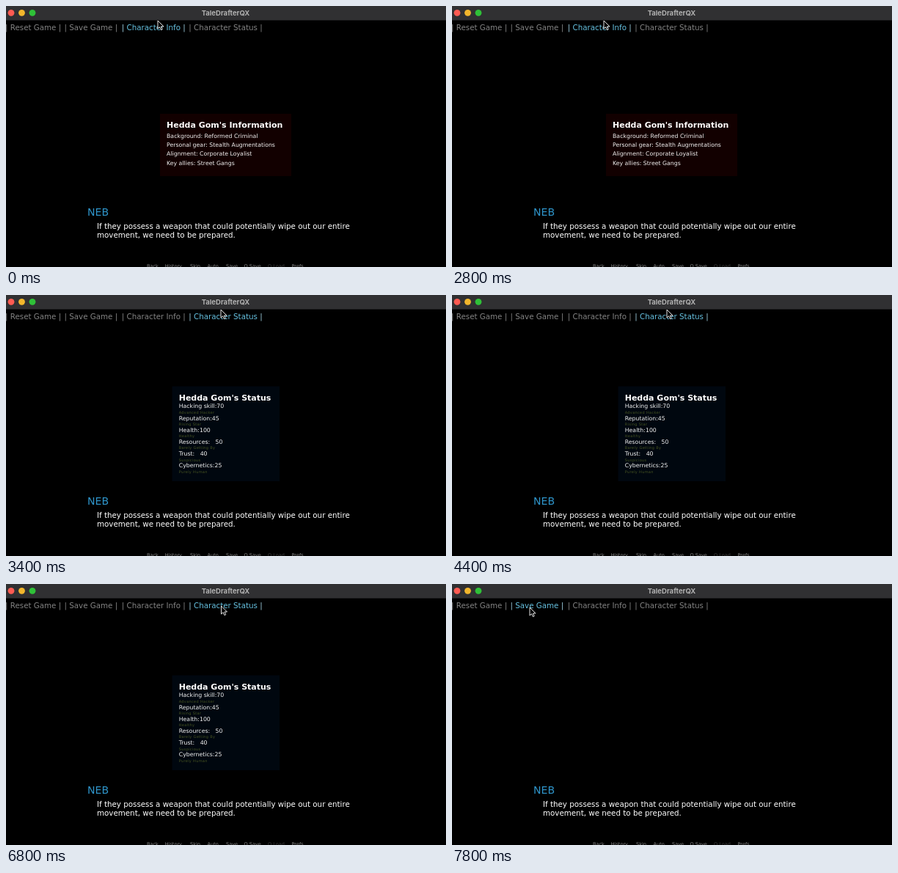
Write an HTML page that moves like this. It is 600 px wide and 356 px high and loops after 8000 ms.

```html
<!DOCTYPE html>
<html lang="en">
<head>
<meta charset="utf-8">
<title>Visual novel menu</title>
<style>
  html, body { margin: 0; width: 100%; height: 100%; overflow: hidden; background: #000; }
  svg { display: block; width: 100%; height: 100%; }
  text { font-family: "DejaVu Sans", sans-serif; white-space: pre; }
  .window-title { font: bold 9.5px Inter, sans-serif; fill: #b1b1b1; text-anchor: middle; }
  .menu { font-size: 10.31px; fill: #838383; }
  .menu.hover { fill: #66c1e0; }
  .menu.hover .bar { fill: #9fd0e2; }
  .speaker { font-size: 14.06px; fill: #2f96cc; }
  .speech { font-size: 10.31px; fill: #fff; }
  .quick { font-size: 6.56px; fill: #858585; }
  .quick.off { fill: #3c3c3c; }
  .heading { font-size: 11px; font-weight: bold; fill: #fff; }
  .detail { font-size: 7.8px; fill: #f4f4f4; }
  .note { font-size: 5px; letter-spacing: .33px; fill: #465422; }
</style>
</head>
<body>
<svg viewBox="0 0 600 356">
  <rect width="600" height="356"/>
  <rect width="600" height="19.5" fill="#303032"/>
  <circle cx="7" cy="9.3" r="4.4" fill="#ff5b52"/>
  <circle cx="21.5" cy="9.3" r="4.4" fill="#f2b62c"/>
  <circle cx="36" cy="9.3" r="4.4" fill="#2fc138"/>
  <text class="window-title" x="299.5" y="12.6">TaleDrafterQX</text>
  <g id="menu"></g>
  <g id="info"><rect x="210" y="147" width="179" height="85" fill="#120000"/></g>
  <g id="status"><rect x="226.5" y="124.5" width="146.5" height="129.5" fill="#00070f"/></g>
  <text class="speaker" x="111" y="286">NEB</text>
  <text class="speech" x="124" y="304">If they possess a weapon that could potentially wipe out our entire</text>
  <text class="speech" x="124" y="316.3">movement, we need to be prepared.</text>
  <g id="quick"></g>
  <path id="cursor" d="M0 0V11L2.6 8.7 4.4 12.6 6.2 11.8 4.5 8H8Z" stroke="#fff" stroke-width=".9"/>
</svg>
<script>
const $ = id => document.getElementById(id);

function addText(parent, className, x, y, content) {
  const node = document.createElementNS("http://www.w3.org/2000/svg", "text");
  node.setAttribute("class", className);
  node.setAttribute("x", x);
  node.setAttribute("y", y);
  node.innerHTML = content;
  parent.append(node);
  return node;
}

const bar = '<tspan class="bar">|</tspan>';
const buttons = [[-1, "Reset Game"], [79.5, "Save Game"], [157.7, "Character Info"], [249.2, "Character Status"]]
  .map(([x, label]) => addText($("menu"), "menu", x, 32.5, `${bar} ${label} ${bar}`));
const [, SAVE, INFO, STATUS] = buttons.keys();

[[192, "Back"], [216.7, "History"], [251, "Skip"], [274.5, "Auto"], [300, "Save"],
 [324.5, "Q.Save"], [357, "Q.Load"], [389.5, "Prefs"]].forEach(([x, label]) =>
  addText($("quick"), label === "Q.Load" ? "quick off" : "quick", x, 356.7, label));

const person = "Hedda Gom";
addText($("info"), "heading", 219, 166, `${person}'s Information`);
["Background: Reformed Criminal", "Personal gear: Stealth Augmentations",
 "Alignment: Corporate Loyalist", "Key allies: Street Gangs"].forEach((line, i) =>
  addText($("info"), "detail", 219, 179.5 + i * 12.45, line));

addText($("status"), "heading", 235.7, 143.7, `${person}'s Status`);
[["Hacking skill:70", "Advanced Hacker"], ["Reputation:45", "Rising Star"], ["Health:100", "Healthy"],
 ["Resources:   50", "Barely Getting By"], ["Trust:   40", "Suspicious"], ["Cybernetics:25", "Purely Human"]]
  .forEach(([line, note], i) => {
    const y = 154.4 + i * 16.2;
    addText($("status"), "detail", 235.7, y, line);
    addText($("status"), "note", 235.7, y + 7.3, note);
  });

// start time, cursor x, cursor y, hovered button
const steps = [
  [0, 207, 20, INFO],
  [3000, 228, 20, INFO],
  [3200, 283, 20, STATUS],
  [3400, 293, 20, STATUS],
  [6600, 293, 25, STATUS],
  [6800, 293.5, 30, STATUS],
  [7000, 291, 35, STATUS],
  [7200, 265, 44, -1],
  [7400, 194, 46, -1],
  [7600, 128, 40, -1],
  [7800, 106, 32, SAVE],
];
const LOOP = 8000;
const start = performance.now();

function draw(now) {
  const time = Math.max(0, now - start) % LOOP;
  const [, x, y, hovered] = steps.findLast(step => step[0] <= time);
  $("cursor").setAttribute("transform", `translate(${x} ${y})`);
  buttons.forEach((button, i) => button.classList.toggle("hover", i === hovered));
  $("info").style.display = hovered === INFO ? "" : "none";
  $("status").style.display = hovered === STATUS ? "" : "none";
  requestAnimationFrame(draw);
}
draw(start);
</script>
</body>
</html>
```
